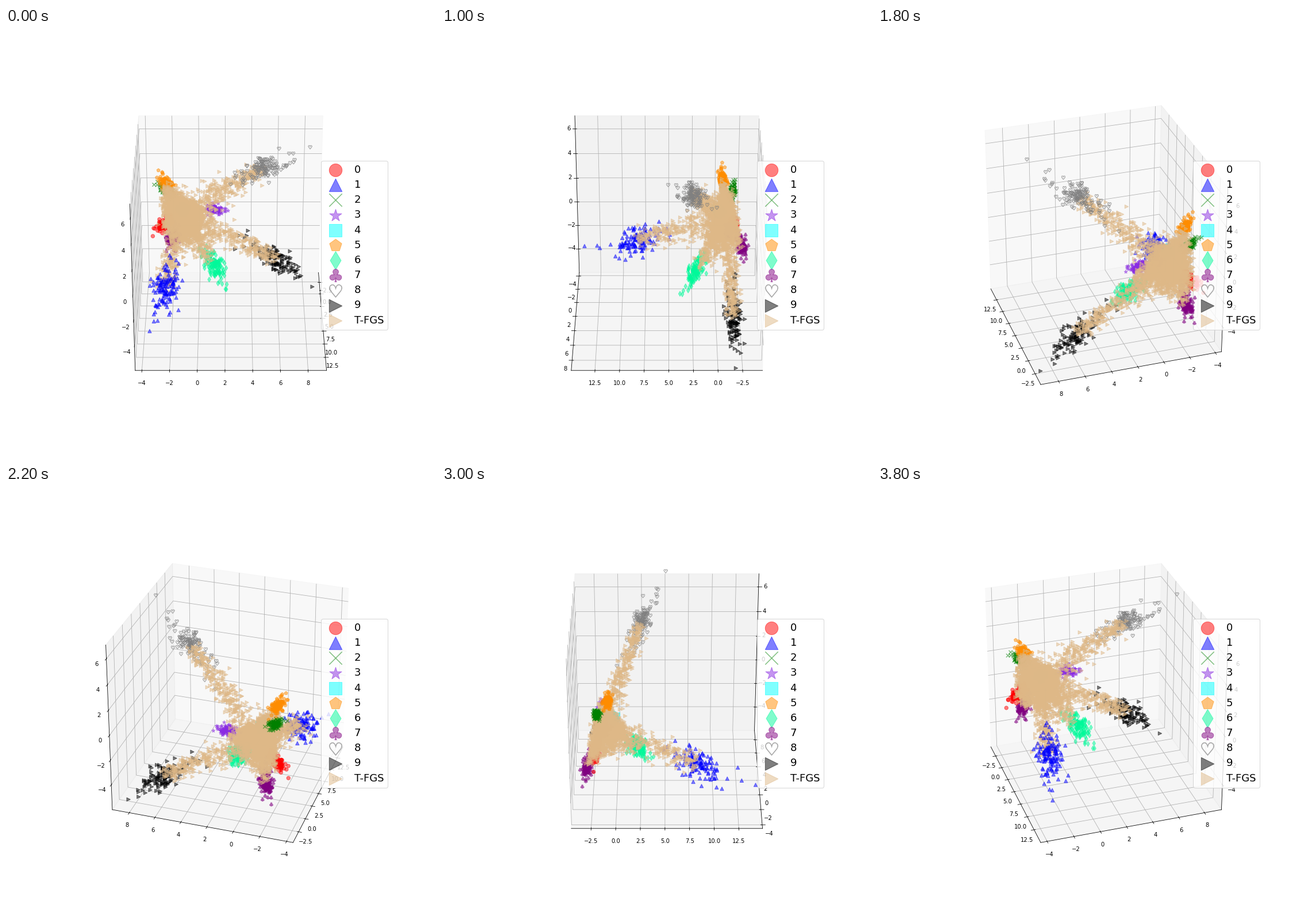
Write a matplotlib script that moves like this. It is 748x748 px and loops after 4000 ms.

```python
import numpy as np
import matplotlib.pyplot as plt
from matplotlib.animation import FuncAnimation

SIZE, DPI = 748, 72
FRAMES, INTERVAL = 20, 200
rng = np.random.default_rng(7)

MARKERS = ["o", "^", "x", "*", "s", "p", "d", r"$\clubsuit$", r"$\heartsuit$", ">"]
COLORS = ["red", "blue", "green", "blueviolet", "cyan", "darkorange",
          "mediumspringgreen", "purple", "gray", "black"]
CENTERS = np.array([
    (-2.0, -2.7, -1.0), (8.4, -2.4, -2.1), (-1.8, -2.45, 1.9), (-1.3, 1.2, .6),
    (-.3, -1.25, 1.0), (-.7, -2.4, 2.9), (2.2, 1.2, -2.7), (-2.9, -2.1, -2.4),
    (2.5, 4.8, 5.3), (-1.7, 6.0, -3.8),
])
CORE = np.array([-1.5, -1.15, 1.0])
ARMS = CENTERS - CORE
REACH = np.linalg.norm(ARMS, axis=1)
FAR = REACH > 7


def cluster(k, n=130):
    # stretched along its own arm, wider the further out it lies
    along = rng.normal(size=(n, 1)) * rng.uniform(.2, 1.3, (n, 1))
    return CENTERS[k] + .17 * along * ARMS[k] + rng.normal(0, .1 + .037 * REACH[k], (n, 3))


def hull(n):
    # random mixes of the near classes and the core
    corners = np.vstack([ARMS[~FAR], np.zeros(3)])
    return rng.dirichlet([.4] * len(corners), n) @ corners


def cone(k, n=320):
    # from the hull out to a far class, narrowing on the way
    t = rng.uniform(0, .97, (n, 1))
    return CORE + .75 * (1 - t) * hull(n) + t * ARMS[k] + rng.normal(0, .32, (n, 3))


def perturbed():
    body = CORE + 1.08 * hull(2400) + rng.normal(0, .18, (2400, 3))
    return np.vstack([body] + [cone(k) for k in np.flatnonzero(FAR)])


fig = plt.figure(figsize=(SIZE / DPI, SIZE / DPI), dpi=DPI)
ax = fig.add_axes([.125, .11, .775, .77], projection="3d")
ax.apply_aspect = lambda position=None: None  # fill the whole rectangle


def scatter(points, marker, color, label):
    ax.scatter(*points.T, s=40, marker=marker, c=color, alpha=.5, label=label)


for k, (marker, color) in enumerate(zip(MARKERS, COLORS)):
    scatter(cluster(k), marker, color, str(k))
scatter(perturbed(), ">", "burlywood", "T-FGS")

ax.set(xlim=(-4.52, 14.91), ylim=(-4.48, 9.33), zlim=(-6.08, 7.05),
       xticks=np.arange(-2.5, 13, 2.5), yticks=np.arange(-4, 9, 2),
       zticks=np.arange(-4, 7, 2))
ax.set_box_aspect((1, 1, 1), zoom=.94676)

legend = ax.legend(loc="center right", fontsize=18, labelspacing=.455)
for handle in legend.legend_handles:
    handle.set_sizes([500])


def update(i):
    azim = 360 * i / FRAMES
    # a tiny nudge settles which walls show in the head-on views
    nudge = .002 * np.sin(np.radians(45 - azim))
    ax.view_init(elev=30, azim=azim + nudge)
    return []


anim = FuncAnimation(fig, update, frames=FRAMES, interval=INTERVAL,
                     repeat=True, repeat_delay=0)
plt.show()
```
